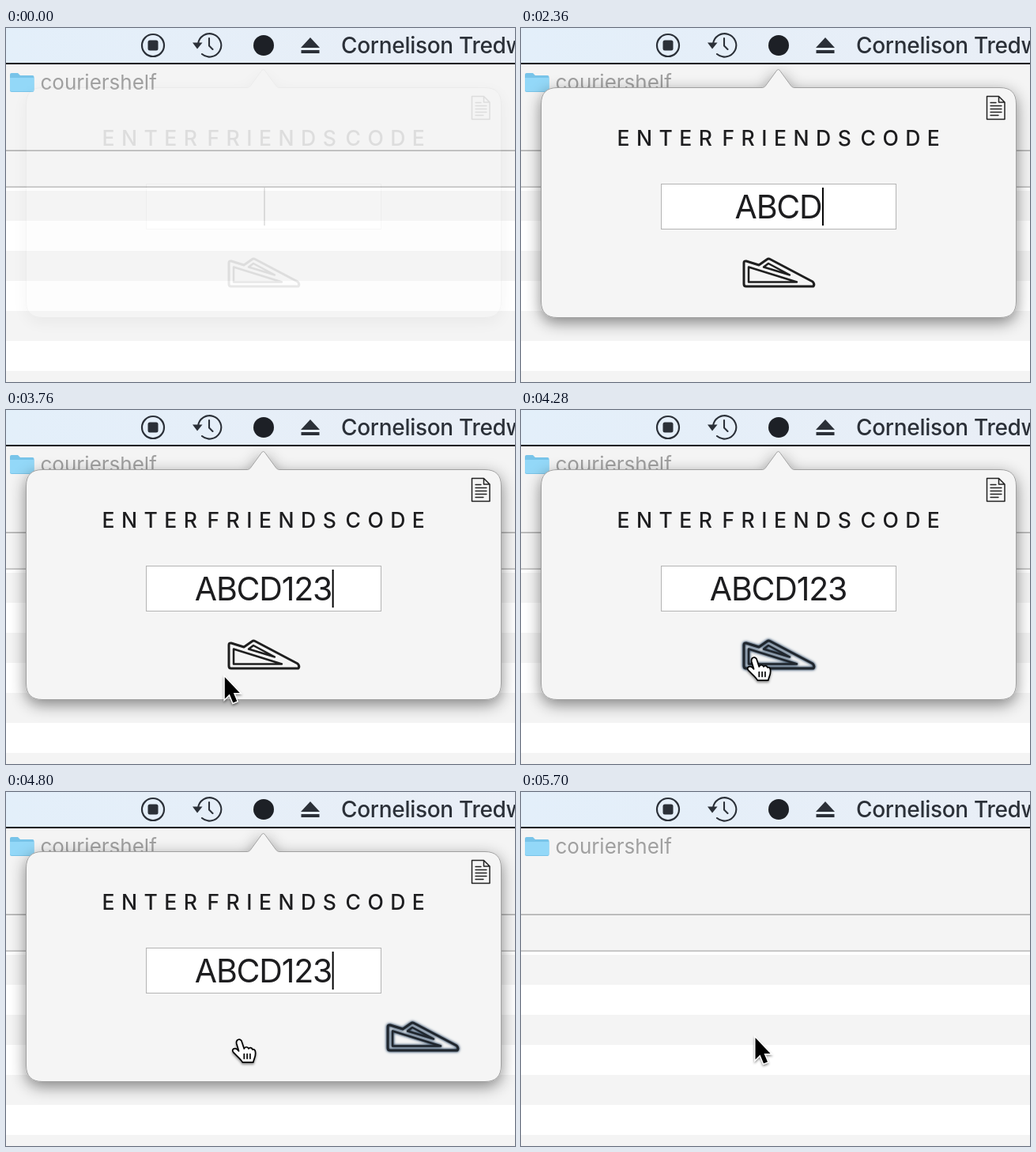
Write an HTML page that moves like this. It is 644 px wide and 448 px high and loops after 5.72 s.

```html
<!DOCTYPE html>
<html lang="en">
<head>
<meta charset="utf-8">
<title>Enter code</title>
<style>
  html, body { margin: 0; width: 100%; height: 100%; overflow: hidden; background: #fff; }
  svg { display: block; width: 644px; height: 448px; }
  text { font-family: Inter, Roboto, sans-serif; }
  .line { fill: none; stroke-linecap: round; stroke-linejoin: round; }
  #plane.hover { stroke: #20262d; filter: drop-shadow(0 0 1.5px #34475b) drop-shadow(0 0 1.5px #7c93ab); }
</style>
</head>
<body>
<svg viewBox="0 0 644 448" xmlns="http://www.w3.org/2000/svg">
  <defs>
    <linearGradient id="bar">
      <stop offset="0" stop-color="#e3effa"/>
      <stop offset="1" stop-color="#e9eef6"/>
    </linearGradient>
    <pattern id="rows" width="644" height="76" y="206" patternUnits="userSpaceOnUse">
      <rect width="644" height="38" fill="#f4f4f4"/>
    </pattern>
    <filter id="shade" filterUnits="userSpaceOnUse" x="-20" y="20" width="684" height="428">
      <feDropShadow dx="0" dy="6" stdDeviation="9.5" flood-color="#000" flood-opacity=".46"/>
    </filter>
    <filter id="lift" filterUnits="userSpaceOnUse" x="-20" y="-20" width="80" height="80">
      <feDropShadow dx="0" dy="2" stdDeviation="1.5" flood-color="#000" flood-opacity=".45"/>
    </filter>
    <clipPath id="inside"><rect x="27" y="76" width="599" height="290" rx="20"/></clipPath>
  </defs>

  <!-- window behind -->
  <rect width="644" height="448" fill="#fff"/>
  <rect y="46" width="644" height="156" fill="#f4f4f4"/>
  <rect y="206" width="644" height="242" fill="url(#rows)"/>
  <rect y="154.500" width="644" height="1.300" fill="#9f9f9f"/>
  <rect y="200.500" width="644" height="1.300" fill="#b0b0b0"/>
  <path d="M5 59q0-2 2-2h8l3 3h15.500q2 0 2 2v17q0 2-2 2H7q-2 0-2-2z" fill="#78c4e9"/>
  <path d="M5 63h30.500v15q0 2-2 2H7q-2 0-2-2z" fill="#93d8f8"/>
  <text x="43.500" y="77.500" font-size="26" fill="#a0a0a0">couriershelf</text>

  <!-- menu bar -->
  <rect width="644" height="44" fill="url(#bar)"/>
  <rect y="44" width="644" height="2" fill="#07060f"/>
  <g fill="#2b3038">
    <circle class="line" cx="186" cy="22" r="14" stroke="#2b3038" stroke-width="2.2"/>
    <rect x="179.500" y="15.500" width="13" height="13" rx="2.500"/>
    <path class="line" d="M243 20A14.700 14.700 0 1 1 248 33M257 13v9.500l4.500 4.500" stroke="#2b3038" stroke-width="2.1"/>
    <path d="M236 18.500h12.500L242 26.500z"/>
    <circle cx="326" cy="22" r="13" fill="#1d2026"/>
    <path d="M385 12l12 13h-24zM373.500 28h23v4h-23z"/>
    <text x="424" y="32" font-size="28" font-weight="500" letter-spacing="-.3">Cornelison Tredwick</text>
  </g>

  <!-- popover -->
  <g id="popover">
    <path d="M46 75.500H305Q308 75.500 309.500 73L323 54.500Q325.500 50.500 328 54.500L341.500 73Q343 75.500 346 75.500H606Q626.500 75.500 626.500 96V346Q626.500 366.500 606 366.500H46Q25.500 366.500 25.500 346V96Q25.500 75.500 46 75.500Z"
      fill="#f5f5f5" stroke="#a0a0a0" stroke-width="1" filter="url(#shade)"/>
    <g class="line" stroke="#222" stroke-width="1.5">
      <path d="M589.500 86.500h15l7.500 7.500V115.500H589.500zM604.500 86.500v7.500h7.500"/>
      <path stroke-width="1.300" d="M594 94.500h7M594 98.500h14M594 102.500h14M594 106.500h14M594 110.500h10"/>
    </g>
    <g font-size="26.500" font-weight="500" letter-spacing="8.500" fill="#1d1d1f">
      <text x="121.500" y="148.500">ENTER</text>
      <text x="254.500" y="148.500">FRIENDS</text>
      <text x="429.500" y="148.500">CODE</text>
    </g>
    <rect x="177.500" y="197.500" width="297" height="57" fill="#fff" stroke="#b4b4b4"/>
    <text id="code" y="241" font-size="41" letter-spacing="-1.200" fill="#1d1d1f"></text>
    <rect id="caret" y="202" width="2" height="48"/>
    <g clip-path="url(#inside)">
      <g id="plane" class="line" stroke="#1f1f1f" stroke-width="3">
        <path d="M282 297Q282 294.500 285 295L301 300 311 293Q313 291.500 315 292.500L369 321Q372 324 370 327H285Q282 327 282 324Z"/>
        <path stroke-width="2.500" d="M288 302.500L349 321.500H288Z"/>
        <path stroke-width="2.500" d="M307 302.500L313 298 340 312.500Z"/>
      </g>
    </g>
  </g>

  <!-- pointer, origin at the hot spot -->
  <g id="pointer">
    <path id="arrow" d="M0 0V27.500L6 21.500 10.500 32.500 15.500 30.500 11 20H19Z" transform="translate(.5 1)"
      stroke="#fff" stroke-width="2.600" paint-order="stroke" filter="url(#lift)"/>
    <g id="hand" class="line" stroke="#000" stroke-width="1.800" transform="translate(-.5 .5) scale(.96)" filter="url(#lift)">
      <path fill="#fff" d="M-4 8C-5 2 2 1 3 6L6 15C7 12 11 12 12 15 13 13 16 13 17 16 20 15 21 18 21 21 21 26 19 28 18 33H4C2 29-3 25-8 20-11 16-7 13-3 16L-1 18Z"/>
      <path stroke-width="1.700" d="M6 22v6M10 22v6M14 22v6"/>
    </g>
  </g>
</svg>
<script>
const LOOP = 5720;
const CODE = "ABCD123";
const KEY_TIMES = [1240, 1480, 1700, 1960, 2460, 2720, 3260];
const CARET_TOGGLES = [580, 1120, 3840, 4380, 4920];
const FADE_IN = [[300, 1], [250, .8], [200, .55], [160, .3], [0, .1]];
const FADE_OUT = { start: 5220, end: 5460 };
const POINTER_SHOWN = 3340, HOVER = 3800, LAUNCH = 4280, HAND_END = 5300;
// [time, x, y]
const PATH = [[3340, 8, 394], [3420, 30, 378], [3560, 203, 387], [3700, 266, 350], [3860, 293, 316], [4000, 296, 310]];

const [popover, code, caret, plane, pointer, arrow, hand] =
  ["popover", "code", "caret", "plane", "pointer", "arrow", "hand"].map(id => document.getElementById(id));

const clamp = v => Math.max(0, Math.min(1, v));
const show = (node, on) => node.setAttribute("visibility", on ? "visible" : "hidden");
const passed = (times, t) => times.filter(k => t >= k).length;

function popoverOpacity(t) {
  if (t >= FADE_OUT.start) return 1 - clamp((t - FADE_OUT.start) / (FADE_OUT.end - FADE_OUT.start));
  return FADE_IN.find(([start]) => t >= start)[1];
}

function pointerAt(t) {
  const i = Math.max(1, PATH.findIndex(p => p[0] > t));
  if (t >= PATH.at(-1)[0]) return PATH.at(-1).slice(1);
  const [a, b] = [PATH[i - 1], PATH[i]];
  const u = clamp((t - a[0]) / (b[0] - a[0]));
  return [1, 2].map(k => a[k] + (b[k] - a[k]) * u);
}

function draw(t) {
  popover.setAttribute("opacity", popoverOpacity(t));

  const typed = CODE.slice(0, passed(KEY_TIMES, t));
  if (code.textContent !== typed) code.textContent = typed;
  const width = typed ? code.getComputedTextLength() : 0;
  code.setAttribute("x", 325.5 - width / 2);
  caret.setAttribute("x", 326 + width / 2);
  show(caret, passed(CARET_TOGGLES, t) % 2 === 0);

  const flight = 106 * Math.max(0, (t - LAUNCH) / 340) ** 1.5;
  plane.setAttribute("transform", `translate(${flight})`);
  plane.classList.toggle("hover", t >= HOVER);

  const pointing = t >= HOVER && t < HAND_END;
  const visible = t >= POINTER_SHOWN;
  pointer.setAttribute("transform", `translate(${pointerAt(t)})`);
  show(arrow, visible && !pointing);
  show(hand, visible && pointing);
}

function tick() {
  draw(performance.now() % LOOP);
  requestAnimationFrame(tick);
}
tick();
</script>
</body>
</html>
```
